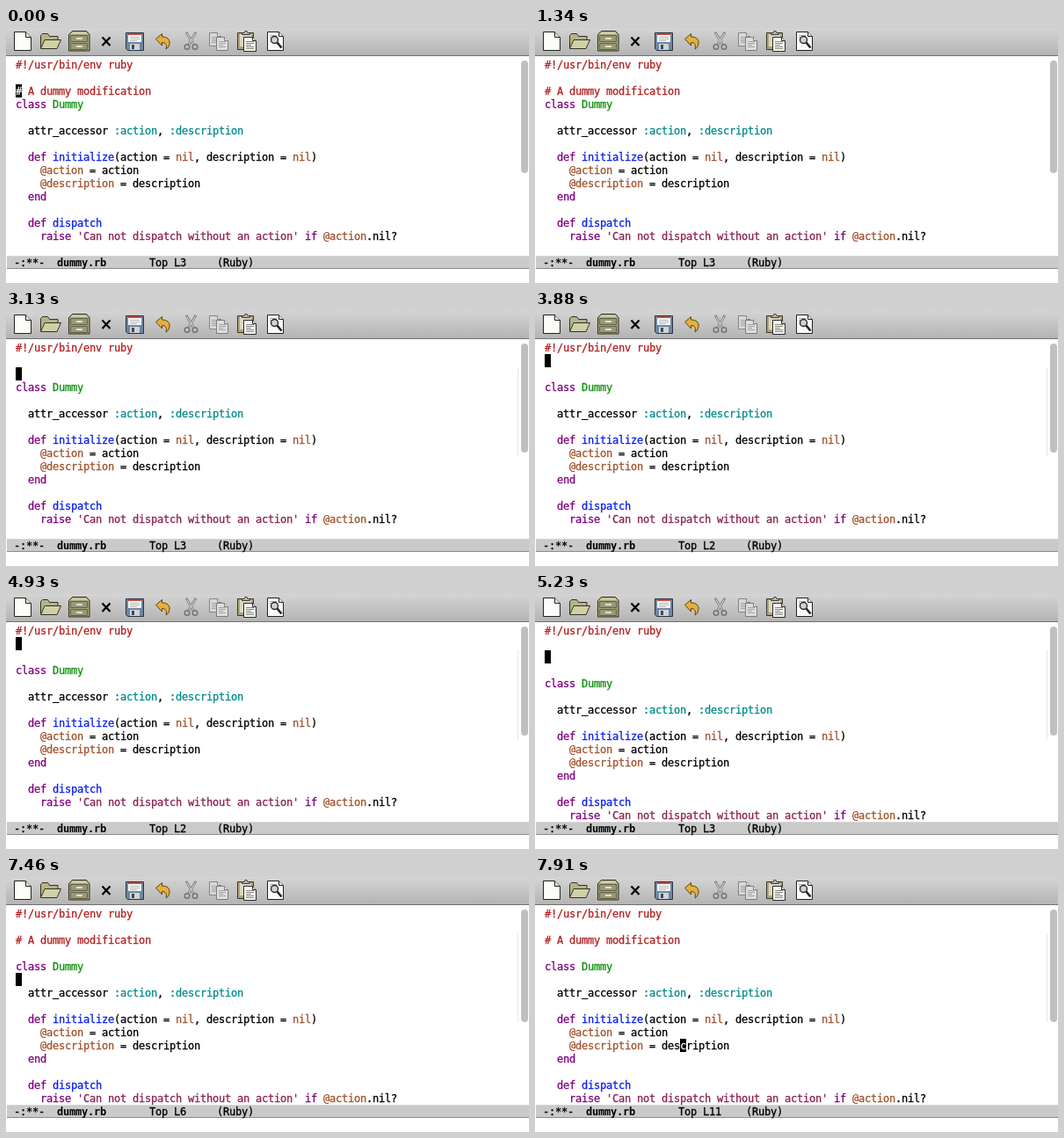
Recreate the animation shown at these times as an HTML page with a canvas. Size 595 px wide and 290 px high, loop 8 s.

```html
<!DOCTYPE html>
<html lang="en">
<head>
<meta charset="utf-8">
<title>Editor session</title>
<style>
html, body { margin: 0; width: 100%; height: 100%; overflow: hidden; background: #fff; }
canvas { display: block; width: 595px; height: 290px; }
</style>
</head>
<body>
<canvas id="stage" width="595" height="290"></canvas>
<script>
const ctx = document.getElementById('stage').getContext('2d');
const LOOP = 8000, CW = 7, LH = 15, LEFT = 11, TOP = 34;
const FONT = '12px "DejaVu Sans Mono", monospace';

const SHEBANG = '#!/usr/bin/env ruby';
const COMMENT = '# A dummy modification';
const BODY = [
  'class Dummy',
  '',
  '  attr_accessor :action, :description',
  '',
  '  def initialize(action = nil, description = nil)',
  '    @action = action',
  '    @description = description',
  '  end',
  '',
  '  def dispatch',
  "    raise 'Can not dispatch without an action' if @action.nil?"
];

// Lines between the shebang and the class
const EDITS = [
  [0, ['', COMMENT]],
  [3130, ['', '']],
  [5230, ['', '', '']],
  [5980, ['', COMMENT, '']]
];

// [time, row, column]; a time alone hides the cursor
const CURSOR = [
  [0, 2, 0], [450], [900, 2, 0], [1340],
  [1490, 2, 22], [1940], [2240, 2, 0], [2830],
  [3130, 2, 0], [3580], [3880, 1, 0], [4330],
  [4930, 1, 0], [5230, 2, 0], [5680],
  [5980, 2, 22], [6430], [6870, 2, 22],
  [7020, 3, 0], [7460, 5, 0], [7610, 6, 22], [7760, 8, 22], [7910, 10, 22]
];

// Comment, string, keyword, symbol, variable, type, function
const SYNTAX = /(#.*)|('[^']*')|\b(class|def|end|raise|if)\b|(:\w+)|(@\w+|\bnil\b(?!\?))|(Dummy)|(initialize|dispatch)/g;
const COLORS = ['#b22222', '#8b2252', '#800080', '#008b8b', '#a0522d', '#129012', '#0a1ff0'];

const rect = (x, y, w, h, color) => {
  ctx.fillStyle = color;
  ctx.fillRect(x, y, w, h);
};

// One glyph per cell; the thin stroke imitates heavy font smoothing
function text(str, x, y, color = '#000', bold = false) {
  ctx.font = (bold ? 'bold ' : '') + FONT;
  ctx.fillStyle = ctx.strokeStyle = color;
  ctx.lineWidth = 0.3;
  [...str].forEach((ch, i) => {
    ctx.fillText(ch, x + i * CW, y + 12);
    if (!bold) ctx.strokeText(ch, x + i * CW, y + 12);
  });
}

function shape(d, fill, stroke, width = 1) {
  const path = new Path2D(d);
  if (fill) {
    ctx.fillStyle = fill;
    ctx.fill(path);
  }
  if (stroke) {
    ctx.strokeStyle = stroke;
    ctx.lineWidth = width;
    ctx.stroke(path);
  }
}

function circle(x, y, r, fill, stroke, width) {
  shape(`M${x - r} ${y}a${r} ${r} 0 1 0 ${2 * r} 0a${r} ${r} 0 1 0 ${-2 * r} 0z`, fill, stroke, width);
}

function gradient(y0, y1, from, to) {
  const g = ctx.createLinearGradient(0, y0, 0, y1);
  g.addColorStop(0, from);
  g.addColorStop(1, to);
  return g;
}

function page(x, y, w, h, fold, fill, line) {
  shape(`M${x} ${y}h${w - fold}l${fold} ${fold}v${h - fold}h${-w}z`, fill, line);
  shape(`M${x + w - fold} ${y}v${fold}h${fold}`, '#e4e4dc', line);
}

function rules(x, y, w, count, color) {
  for (let i = 0; i < count; i++) rect(x, y + i * 2, w - (i % 3 === 2 ? 3 : 0), 1, color);
}

function newIcon() {
  page(9.5, 4.5, 19, 21, 6, '#fcfcf8', '#222');
}

function openIcon() {
  shape('M39.5 22.5V8.5l2-2h6l2 3h9.5v4', '#b4b48a', '#33331f');
  shape('M39.5 23.5l4.5-10h18.5l-4.5 10z', '#d0d0a8', '#33331f');
}

function cabinetIcon() {
  shape('M71.5 7.5l4-4h16l3.5 4v18.5h-23.5z', '#a6a67c', '#2f2f1e');
  shape('M73 7l3-2.5h15l2.5 2.5z', '#cdcda8');
  for (const y of [8.5, 17.5]) {
    shape(`M73.5 ${y}h19v7h-19z`, '#98987a', '#606048');
    rect(80, y + 2.5, 7, 2, '#e2e2c0');
  }
}

function closeIcon() {
  shape('M109.5 10.5l9 9.5M118.5 10.5l-9 9.5', null, '#000', 2.2);
}

function saveIcon() {
  shape('M136.5 5.5h20v20h-18l-2-2z', '#6d879f', '#263442');
  rect(139, 6, 15, 10, '#f5f5f5');
  rect(139, 6, 15, 2, '#c64e3c');
  rules(141, 10, 11, 3, '#b7bdc3');
  rect(141, 18, 11, 7, '#d0d4d6');
  rect(143, 19, 3, 5, '#39495a');
}

function undoIcon() {
  shape('M170.5 12.5l7-6v3.500c6 0 9 3 8.5 7.5-.3 3-2 5.5-4 6.5 1.500-5-.5-7.5-4.5-7.5v3.5z',
    '#e4b03a', '#5c3f10');
}

function cutIcon() {
  shape('M205 5l8.5 14M216 5l-8.5 14', null, '#757575', 2.6);
  shape('M205.5 6l8 13M215.5 6l-8 13', null, '#d4d4d4', 1.2);
  circle(206, 21.5, 2.8, null, '#747474', 1.5);
  circle(215, 21.5, 2.8, null, '#747474', 1.5);
}

function copyIcon() {
  page(231.5, 5.5, 13, 15, 4, '#d8d8d8', '#858585');
  rules(234, 10, 8, 4, '#a4a4a4');
  page(239.5, 10.5, 13, 15, 4, '#dedede', '#7c7c7c');
  rules(242, 15, 8, 4, '#a4a4a4');
}

function pasteIcon() {
  shape('M263.5 5.5h18v19h-18z', '#aea27c', '#3d3424');
  rect(266, 7, 13, 14, '#dcd6c0');
  shape('M268.5 7.5v-2h2.5l1-2h2l1 2h2.5v2z', '#bcbcb5', '#3b3b36');
  page(270.5, 10.5, 14, 16, 4, '#fafaf6', '#292929');
  rules(273, 15, 9, 5, '#85857f');
}

function searchIcon() {
  page(297.5, 4.5, 18, 21, 5, '#fafaf6', '#222');
  rules(300, 8, 8, 2, '#aaa');
  shape('M308.5 16.5l5 6', null, '#222', 2.6);
  circle(305.5, 13.5, 4, '#cbd5da', '#282828', 1.4);
}

const ICONS = [newIcon, openIcon, cabinetIcon, closeIcon, saveIcon,
  undoIcon, cutIcon, copyIcon, pasteIcon, searchIcon];

function toolbar() {
  rect(0, 0, 595, 31, gradient(0, 31, '#d4d4d4', '#b4b4b4'));
  rect(0, 31, 595, 1, '#707070');
  for (const icon of ICONS) icon();
}

function codeLine(str, row) {
  const y = TOP + row * LH;
  const put = (part, at, color) => text(part, LEFT + at * CW, y, color);
  let end = 0;
  for (const m of str.matchAll(SYNTAX)) {
    put(str.slice(end, m.index), end);
    put(m[0], m.index, COLORS[m.slice(1).findIndex(Boolean)]);
    end = m.index + m[0].length;
  }
  put(str.slice(end), end);
}

function scrollbar(t) {
  if (t >= 3130) rect(582, 64, 1, 101, '#e6e6e6');
  const bottom = t >= 3130 && t < 5980 ? 161 : 165;
  ctx.beginPath();
  ctx.roundRect(586, 37, 8, bottom - 37, 4);
  ctx.fillStyle = '#bfbfbf';
  ctx.fill();
}

function modeLine(line) {
  rect(1, 259, 594, 15, '#cacaca');
  rect(1, 259, 594, 1, '#d6d6d6');
  rect(1, 273, 594, 1, '#8c8c8c');
  const put = (str, col, bold) => text(str, 9 + col * CW, 259, '#000', bold);
  put('-:**-', 0);
  put('dummy.rb', 7, true);
  put('Top L' + line, 22);
  put('(Ruby)', 33);
}

const latest = (list, t) => list.filter(item => item[0] <= t).pop();

function draw(t) {
  rect(0, 0, 595, 290, '#fff');
  toolbar();
  scrollbar(t);

  const lines = [SHEBANG, ...latest(EDITS, t)[1], ...BODY];
  lines.forEach(codeLine);

  const [, row, col] = latest(CURSOR.filter(c => c.length > 1), t);
  if (latest(CURSOR, t).length > 1) {
    const x = LEFT + col * CW, y = TOP + row * LH;
    rect(x, y, CW, LH, '#000');
    text(lines[row][col] || '', x, y, '#fff');
  }

  modeLine(row + 1);
  if (t >= 5830 && t < 7020) text('Mark set', LEFT, 274);
}

const start = performance.now();
function tick() {
  draw((performance.now() - start) % LOOP);
  requestAnimationFrame(tick);
}
tick();
</script>
</body>
</html>
```
